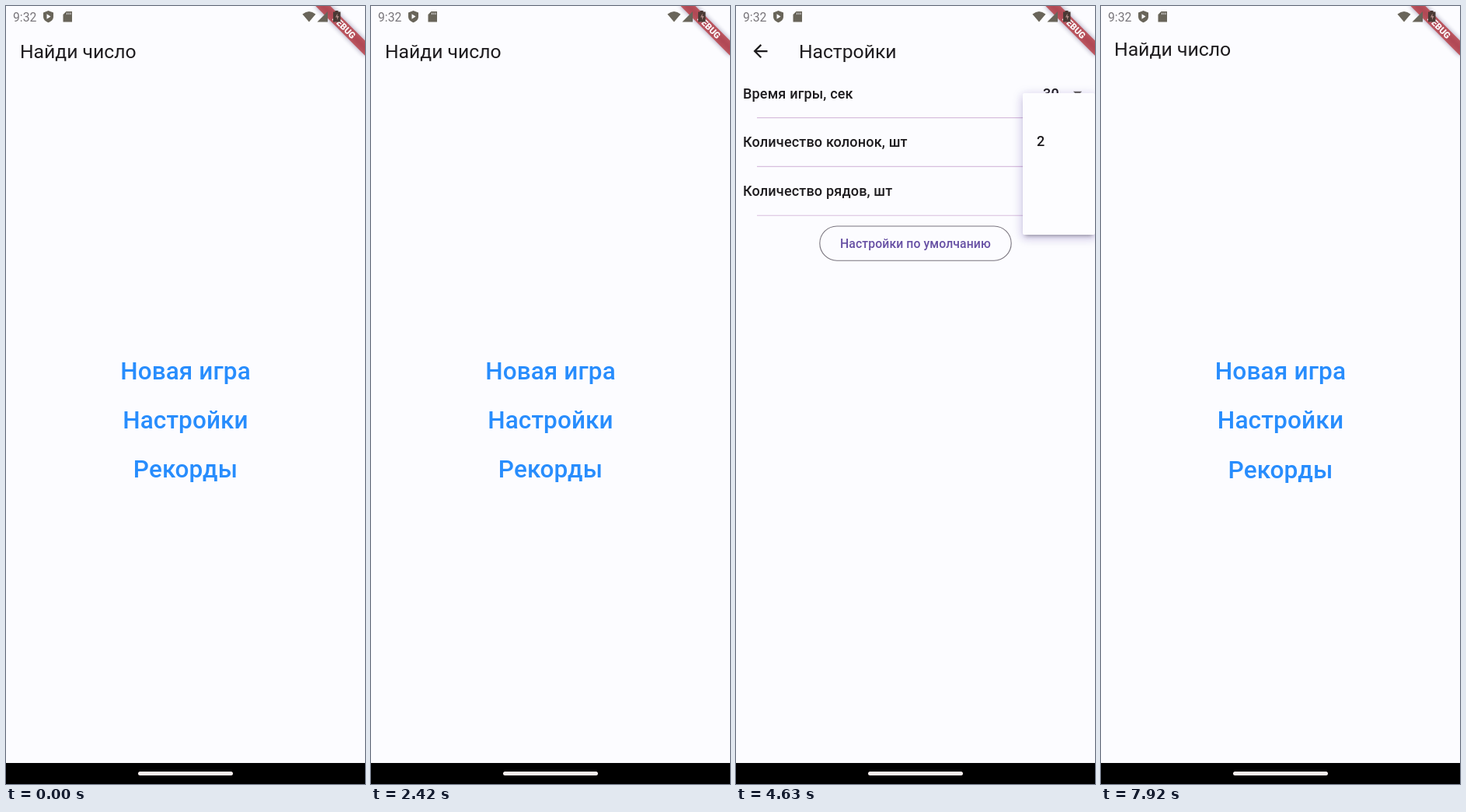
An HTML page that plays this animation: 462 px wide and 1000 px high, repeating every 8 s.

```html
<!DOCTYPE html>
<html lang="ru">
<head>
<meta charset="utf-8">
<title>Найди число</title>
<style>
:root { --bg: #fcfcff; --ink: #1d1b1e; --loop: 8s linear infinite; }
html, body { margin: 0; width: 100%; height: 100%; overflow: hidden; background: var(--bg); }
.stage { position: relative; width: 462px; height: 1000px; overflow: hidden; background: var(--bg);
  font-family: Roboto, sans-serif; color: var(--ink); }
.page, .system { position: absolute; left: 0; top: 0; width: 462px; height: 1000px; }
.page { background: var(--bg); transform-origin: 231px 486px; }
svg { display: block; }
text { fill: var(--ink); }
.title { font-size: 24.7px; }
.link { font-size: 31.46px; font-weight: 500; letter-spacing: .11px; text-anchor: middle; fill: #288dfd; }
.row { font-size: 18px; font-weight: 500; letter-spacing: .17px; }
.outlined { font-size: 15.73px; font-weight: 500; letter-spacing: .11px; text-anchor: middle; fill: #6750a4; }
.clock { font-size: 15.73px; fill: #79767b; }
.debug { font-size: 11.46px; font-weight: 900; text-anchor: middle; fill: #fff; }

.menu { position: absolute; left: 369px; top: 84px; width: 93px; height: 282px; overflow: hidden;
  border-radius: 2px; background: #fdfdff;
  box-shadow: 0 5.6px 5px -3.4px rgba(0,0,0,.32), 0 4px 12px 1px rgba(70,50,150,.14), 0 3px 14px 2px rgba(80,50,170,.12);
  animation: menu var(--loop); }
.list { position: absolute; left: 0; top: 0; width: 93px; height: 282px; animation: list var(--loop); }
.item { position: absolute; left: 18px; top: calc(9px + var(--i) * 53.9px); line-height: 54px;
  font-size: 18px; font-weight: 500; letter-spacing: .17px;
  animation: item var(--loop) calc(var(--i) * 13ms) backwards; }
.item.chosen { animation: none; }
.thumb { position: absolute; right: 0; top: 1px; width: 5px; height: 142px; background: #bcbabb;
  animation: thumb var(--loop); }

.home { animation: home var(--loop); }
.settings { animation: settings var(--loop), fade var(--loop); }

@keyframes home {
  0%, 32.5% { transform: scale(1); animation-timing-function: cubic-bezier(.05,0,.1333,.06); }
  33.125% { transform: scale(1.02); animation-timing-function: cubic-bezier(.2083,.82,.25,1); }
  36.25%, 96.999% { transform: scale(1.05); }
  97% { transform: scale(1.1); animation-timing-function: cubic-bezier(.05,0,.1333,.06); }
  97.625% { transform: scale(1.06); animation-timing-function: cubic-bezier(.2083,.82,.25,1); }
  99%, 100% { transform: scale(1.005); }
}
@keyframes settings {
  0%, 32.5% { transform: scale(.85); animation-timing-function: cubic-bezier(.05,0,.1333,.06); }
  33.125% { transform: scale(.91); animation-timing-function: cubic-bezier(.2083,.82,.25,1); }
  36.25%, 97% { transform: scale(1); animation-timing-function: cubic-bezier(.05,0,.1333,.06); }
  97.625% { transform: scale(.96); animation-timing-function: cubic-bezier(.2083,.82,.25,1); }
  99%, 100% { transform: scale(.9); }
}
@keyframes fade {
  0%, 32.97% { opacity: 0; }
  33.44%, 97.31% { opacity: 1; }
  97.78%, 100% { opacity: 0; }
}
@keyframes menu {
  0%, 56.425% { opacity: 0; top: 148px; height: 54px; }
  57.3625% { opacity: 1; top: 148px; height: 54px; }
  58.3%, 80% { opacity: 1; top: 84px; height: 282px; }
  80.94%, 100% { opacity: 0; top: 84px; height: 282px; }
}
@keyframes list {
  0%, 57.3625% { top: -64px; }
  58.3%, 100% { top: 0; }
}
@keyframes item {
  0%, 58.46% { opacity: 0; }
  58.71%, 100% { opacity: 1; }
}
@keyframes thumb {
  0%, 58.3% { opacity: 0; }
  62%, 100% { opacity: 1; }
}
</style>
</head>
<body>
<div class="stage">
  <div class="page home">
    <svg width="462" height="1000">
      <text class="title" x="18" y="66.5">Найди число</text>
      <text class="link" x="231" y="480">Новая игра</text>
      <text class="link" x="231" y="543">Настройки</text>
      <text class="link" x="231" y="606">Рекорды</text>
    </svg>
  </div>

  <div class="page settings">
    <svg width="462" height="1000">
      <defs>
        <g id="drop">
          <path d="M434 -2.4h11.2l-5.6 5.6z" fill="#66645f"/>
          <path d="M27 31.4H462" stroke="#d8bedd" stroke-width="1.1"/>
        </g>
      </defs>
      <path transform="translate(18 44.6) scale(1.1236)" fill="#1d1b1e"
        d="M20 11H7.83l5.59-5.59L12 4l-8 8 8 8 1.41-1.41L7.83 13H20z"/>
      <text class="title" x="80.9" y="66.5">Настройки</text>
      <g class="row">
        <text x="9" y="118.5">Время игры, сек</text>
        <text x="395" y="118.5">30</text>
        <text x="9" y="181.4">Количество колонок, шт</text>
        <text x="405.2" y="181.4">2</text>
        <text x="9" y="244.3">Количество рядов, шт</text>
        <text x="405.2" y="244.3">2</text>
      </g>
      <use href="#drop" y="112.2"/>
      <use href="#drop" y="175"/>
      <use href="#drop" y="237.8"/>
      <rect x="107.8" y="283" width="246.4" height="44.2" rx="22.1" fill="none" stroke="#79747e" stroke-width="1.1"/>
      <text class="outlined" x="231" y="311">Настройки по умолчанию</text>
    </svg>
  </div>

  <div class="menu">
    <div class="list">
      <div class="item" style="--i:0">1</div>
      <div class="item chosen" style="--i:1">2</div>
      <div class="item" style="--i:2">3</div>
      <div class="item" style="--i:3">4</div>
      <div class="item" style="--i:4">5</div>
      <div class="thumb"></div>
    </div>
  </div>

  <svg class="system" width="462" height="1000">
    <defs>
      <filter id="soft" x="-20%" y="-100%" width="140%" height="300%"><feGaussianBlur stdDeviation="3.4"/></filter>
    </defs>
    <g transform="translate(462 0) rotate(45)">
      <rect x="-45" y="31.5" width="90" height="13.5" fill="#1c1040" opacity=".42" filter="url(#soft)"/>
      <rect x="-45" y="31.5" width="90" height="13.5" fill="#b72a32" opacity=".72"/>
      <text class="debug" x="0" y="42.3">DEBUG</text>
    </g>
    <text class="clock" x="9" y="19.5">9:32</text>
    <g fill="#69655a">
      <path d="M54.5 6l6.5 2.5v5c0 4-3 6.500-6.500 7.800c-3.500-1.300-6.500-3.800-6.500-7.800v-5z"/>
      <path d="M77.500 7H85v13.500H73.500V11z"/>
      <path d="M381.500 10.500Q390 3.500 398.500 10.500L390 20.500z"/>
      <path d="M414 7v13.500h-13.500z"/>
    </g>
    <path d="M52.500 10.300v6.400l5-3.200z" fill="#fcfcff"/>
    <path d="M78.500 8.500v2.600M80.800 8.500v2.600M83 8.500v2.600" stroke="#fcfcff" stroke-width=".8"/>
    <path d="M423.500 6h4v1.500h3V20.500h-9.500V7.500h2.500z" fill="#4a3934"/>
    <path d="M426.500 9.500l-2.500 5h2v3.500l2.500-5h-2z" fill="#b08c88"/>
    <rect y="973" width="462" height="27"/>
    <rect x="170" y="984" width="122" height="5" rx="2.500" fill="#f7efee"/>
  </svg>
</div>
</body>
</html>
```
